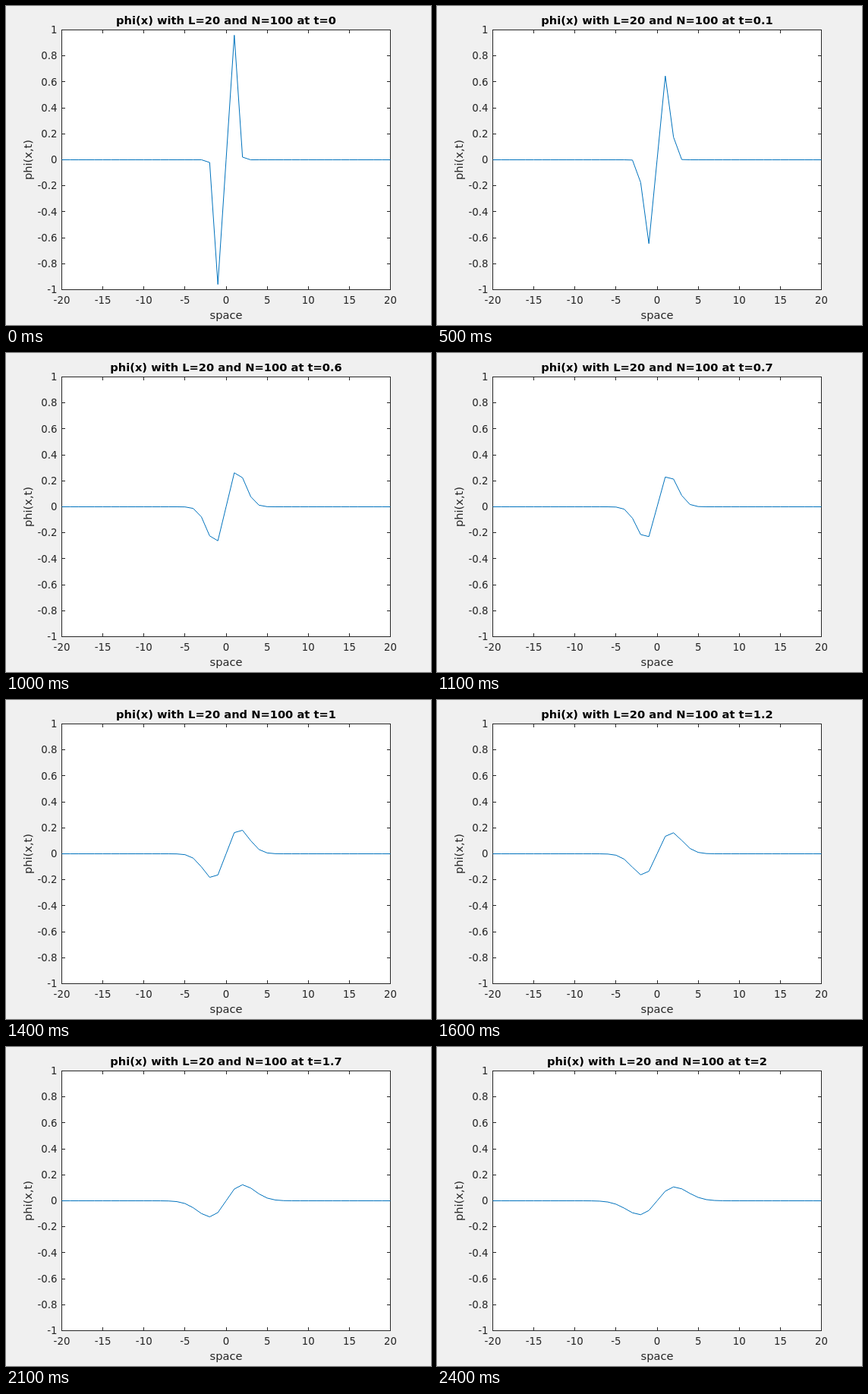
Write an HTML page with a canvas that moves like this. It is 560 by 420 pixels and loops after 2.5 s.

```html
<!DOCTYPE html>
<html lang="en">
<head>
<meta charset="utf-8">
<title>Diffusion of phi</title>
<style>
  html, body { margin: 0; width: 100%; height: 100%; overflow: hidden; background: #f0f0f0; }
  canvas { display: block; }
</style>
</head>
<body>
<canvas id="stage" width="560" height="420"></canvas>
<script>
const ctx = document.getElementById('stage').getContext('2d');
const L = 20, N = 100;
const box = { left: 73.5, top: 31.5, right: 506.5, bottom: 373.5 };
const INK = '#262626', FAMILY = '"DejaVu Sans", sans-serif';

const px = x => box.left + (x + L) / (2 * L) * (box.right - box.left);
const py = y => box.top + (1 - y) / 2 * (box.bottom - box.top);

// Sine series of an odd pair of unit tents at x = 1 and x = -1, decaying by the heat equation.
function phi(x, t) {
  let sum = 0;
  for (let m = 1; m <= N; m++) {
    const k = m * Math.PI / L, s = Math.sin(k / 2) / (k / 2);
    sum += Math.sin(k) * s * s * Math.exp(-k * k * t) * Math.sin(k * x);
  }
  return sum * 2 / L;
}

function label(text, x, y, align = 'center', size = 13.333, weight = '', color = INK) {
  ctx.font = `${weight} ${size}px ${FAMILY}`;
  ctx.textAlign = align;
  ctx.fillStyle = color;
  ctx.fillText(text, x, y);
}

function line(points, color) {
  ctx.strokeStyle = color;
  ctx.beginPath();
  points.forEach(([x, y]) => ctx.lineTo(x, y));
  ctx.stroke();
}

function drawAxes() {
  const { left, top, right, bottom } = box, tick = 4.5;
  const snap = v => Math.floor(v) + 0.5;
  ctx.strokeStyle = INK;
  ctx.strokeRect(left, top, right - left, bottom - top);
  for (let v = -20; v <= 20; v += 5) {
    const x = snap(px(v));
    line([[x, top], [x, top + tick]], INK);
    line([[x, bottom], [x, bottom - tick]], INK);
    label(v, px(v), 392);
  }
  for (let i = -5; i <= 5; i++) {
    const y = snap(py(i / 5));
    line([[left, y], [left + tick, y]], INK);
    line([[right, y], [right - tick, y]], INK);
    label(i / 5, 67.5, Math.round(py(i / 5) + 4.6), 'right');
  }
  label('space', 290, 412, 'center', 14.667);
  ctx.save();
  ctx.translate(34, 202.5);
  ctx.rotate(-Math.PI / 2);
  label('phi(x,t)', 0, 0, 'center', 14.667);
  ctx.restore();
}

function draw(step) {
  const t = step / 10;
  ctx.fillStyle = '#f0f0f0';
  ctx.fillRect(0, 0, 560, 420);
  ctx.fillStyle = '#fff';
  ctx.fillRect(box.left, box.top, box.right - box.left, box.bottom - box.top);
  drawAxes();
  label(`phi(x) with L=${L} and N=${N} at t=${t}`, 290, 24, 'center', 14.667, 'bold', '#000');
  const curve = [];
  for (let x = -L; x <= L; x++) curve.push([px(x), py(phi(x, t))]);
  line(curve, '#0072bd');
}

let shown = -1;
function tick() {
  const step = Math.max(0, Math.floor(performance.now() % 2500 / 100) - 4);
  if (step !== shown) draw(shown = step);
  requestAnimationFrame(tick);
}
tick();
</script>
</body>
</html>
```
